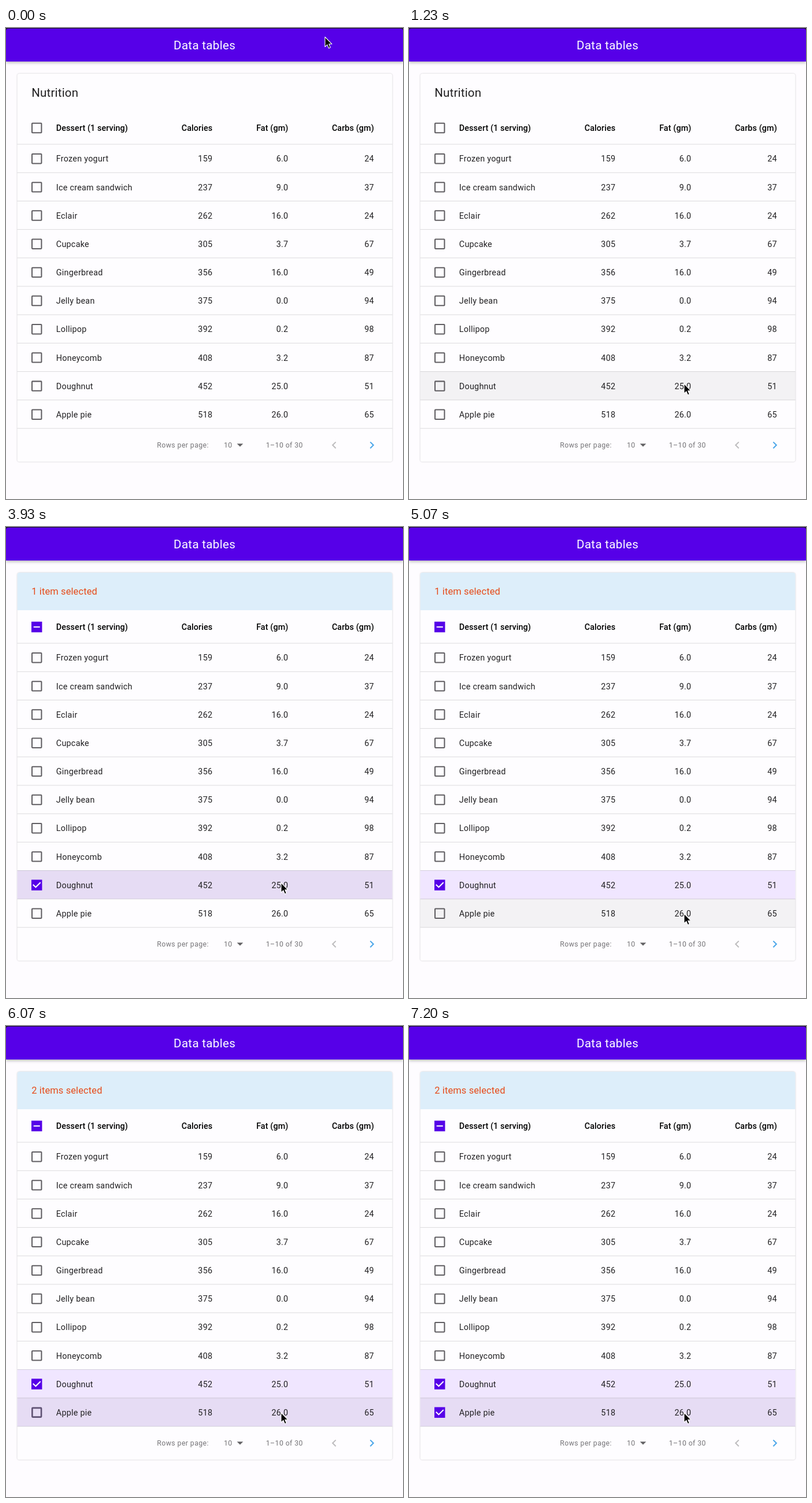
Recreate the animation shown at these times as an HTML page. Size 687 by 815 pixels, loop 7.26 s.

```html
<!DOCTYPE html>
<html lang="en">
<head>
<meta charset="utf-8">
<title>Data tables</title>
<style>
  html, body { margin: 0; width: 100%; height: 100%; overflow: hidden; background: #fefcff; }
  svg { display: block; }
  text { font: 14.35px Roboto, sans-serif; letter-spacing: .256px; fill: #212022; white-space: pre; }
  .title { font-size: 20.5px; letter-spacing: .33px; fill: #fff; }
  .heading { font-size: 20.5px; letter-spacing: .2px; }
  .selected { font-size: 16.4px; letter-spacing: .154px; fill: #e64a19; }
  .column { font-weight: 500; letter-spacing: .1px; fill: #000; }
  .footer { font-size: 12.3px; letter-spacing: .41px; fill: #757477; }
  .end { text-anchor: end; }
  .line { fill: rgba(0, 0, 0, .135); }
  .bar { filter: drop-shadow(0 2px 2.5px rgba(0, 0, 0, .28)); }
  .card { filter: drop-shadow(0 .8px 1px rgba(0, 0, 0, .22)); }
  .mark { fill: none; stroke: #fff; stroke-width: 2.05; }
</style>
</head>
<body>
<svg id="stage" width="687" height="815" viewBox="0 0 687 815"></svg>
<script>
const LOOP = 7260;
const LEFT = 19.5, WIDTH = 649, TOP = 201, STEP = 49.17;
const COLUMN_ENDS = [357.3, 488.4, 636.8];
const DESSERTS = [
  ['Frozen yogurt', '159', '6.0', '24'],
  ['Ice cream sandwich', '237', '9.0', '37'],
  ['Eclair', '262', '16.0', '24'],
  ['Cupcake', '305', '3.7', '67'],
  ['Gingerbread', '356', '16.0', '49'],
  ['Jelly bean', '375', '0.0', '94'],
  ['Lollipop', '392', '0.2', '98'],
  ['Honeycomb', '408', '3.2', '87'],
  ['Doughnut', '452', '25.0', '51'],
  ['Apple pie', '518', '26.0', '65']
];
// `shown` is when the row turns selected; `toggled` is where its checkbox motion begins.
const CLICKS = [
  { row: 8, shown: 2700, toggled: 2650, radius: 34, y: 617 },
  { row: 9, shown: 6070, toggled: 6045, radius: -8, y: 669 }
];
const MOVES = [
  { start: 830, end: 1230, from: [552, 15.5], to: [476, 615.5] },
  { start: 4630, end: 4930, from: [476, 615.5], to: [476, 669] }
];

const stage = document.getElementById('stage');
const clamp = x => Math.min(1, Math.max(0, x));
const mix = (a, b, k) => a + (b - a) * k;
const easeInOut = x => x * x * (3 - 2 * x);

function set(el, attrs) {
  for (const name in attrs) el.setAttribute(name, attrs[name]);
  return el;
}

function add(tag, attrs = {}, parent = stage) {
  const el = document.createElementNS('http://www.w3.org/2000/svg', tag);
  return parent.appendChild(set(el, attrs));
}

function label(x, y, string, style = '') {
  const el = add('text', { x, y, class: style });
  el.textContent = string;
  return el;
}

function addCheckbox(y, markPath) {
  const group = add('g', { transform: `translate(53.2 ${y})` });
  return {
    box: add('rect', { fill: 'none' }, group),
    mark: add('path', { d: markPath, class: 'mark', pathLength: 1 }, group)
  };
}

// The outline thickens inwards until the box is solid, then the mark is drawn.
function poseCheckbox({ box, mark }, time, toggled, centred) {
  const t = Math.pow(clamp((time - toggled) / 200), 1.7);
  const size = 18.45 - 2 * (1 - Math.abs(t - .5) * 2);
  const outer = t > 0 ? size : 18.45;
  const stroke = Math.min(outer / 2, 2.05 + outer * t);
  const side = outer - stroke;
  const tint = clamp(t * 4);
  const colour = [mix(96, 86, tint), mix(94, 0, tint), mix(98, 232, tint)].map(Math.round);
  set(box, {
    x: -side / 2, y: -side / 2, width: side, height: side, rx: stroke < 4 ? .8 : 0,
    'stroke-width': stroke, stroke: `rgb(${colour})`
  });
  const drawn = clamp(t * 2 - 1);
  set(mark, {
    visibility: drawn > 0 ? 'visible' : 'hidden',
    'stroke-dasharray': `${drawn} 2`,
    'stroke-dashoffset': centred ? -(1 - drawn) / 2 : 0
  });
}

const CHECK = 'M-6.5 -.9L-1.8 3.7L6.5 -4.6';
const DASH = 'M-5.5 0H5.5';

// Card, banner and heading
add('rect', { x: LEFT, y: 79, width: WIDTH, height: 671.5, rx: 4, fill: '#fefdff', class: 'card' });
const banner = add('path', {
  d: `M${LEFT} 144V83q0 -4 4 -4h${WIDTH - 8}q4 0 4 4v61z`, fill: '#ddeefa'
});
const heading = label(44.2, 119.3, 'Nutrition', 'heading');
const selection = label(44.2, 117.4, '', 'selected');

// Column names
const headBox = addCheckbox(173, DASH);
label(86.8, 178.3, 'Dessert (1 serving)', 'column');
['Calories', 'Fat (gm)', 'Carbs (gm)'].forEach((name, i) =>
  label(COLUMN_ENDS[i], 178.3, name, 'column end'));

// Rows
const rows = DESSERTS.map(([name, ...values], i) => {
  const y = TOP + i * STEP;
  const area = { x: LEFT, y, width: WIDTH, height: STEP };
  const fill = add('rect', { ...area, fill: '#f0e6ff' });
  const hover = add('rect', { ...area, fill: 'rgba(0,0,0,.043)' });
  const clip = add('svg', { ...area, overflow: 'hidden' });
  const ripple = add('circle', { cx: 476 - LEFT, fill: 'rgba(188,188,188,.38)', r: 0 }, clip);
  const checkbox = addCheckbox(226.2 + i * STEP, CHECK);
  const baseline = 231.4 + i * STEP;
  label(86.8, baseline, name);
  values.forEach((value, k) => label(COLUMN_ENDS[k], baseline, value, 'end'));
  return { y, fill, hover, ripple, checkbox, click: CLICKS.find(c => c.row === i) };
});
for (let i = 0; i <= rows.length; i++) {
  add('rect', { x: LEFT, y: TOP - .4 + i * STEP, width: WIDTH, height: 1.03, class: 'line' });
}

// Footer
label(261.3, 726, 'Rows per page:', 'footer');
label(377, 726, '10', 'footer');
add('path', { d: 'M399.7 719.3h10.6l-5.3 5.3z', fill: '#626164' });
label(449.8, 726, '1–10 of 30', 'footer');
const CHEVRON = 'M-2.4 -6.15L-3.8 -4.7L.9 0L-3.8 4.7L-2.4 6.15L3.8 0z';
add('path', { d: CHEVRON, transform: 'translate(567.6 721.8) scale(-1 1)', fill: '#bdbcbe' });
add('path', { d: CHEVRON, transform: 'translate(633.4 721.8)', fill: '#4ba6e9' });

// App bar
add('rect', { width: 687, height: 10, fill: '#1d1426' });
add('path', { d: 'M0 58V5q0 -4 4 -4h679q4 0 4 4v53z', fill: '#5600e8', class: 'bar' });
label(343.6, 37.4, 'Data tables', 'title').setAttribute('text-anchor', 'middle');

const cursor = add('path', {
  d: 'M0 0V17L3.9 13.4L6.5 19.5L9.3 18.3L6.8 12.3H12z',
  fill: '#000', stroke: '#fff', 'stroke-width': 1.1, 'stroke-linejoin': 'round'
});

function cursorAt(time) {
  const move = time < MOVES[1].start ? MOVES[0] : MOVES[1];
  const k = easeInOut(clamp((time - move.start) / (move.end - move.start)));
  return move.from.map((v, i) => mix(v, move.to[i], k));
}

const show = (el, visible) => el.setAttribute('visibility', visible ? 'visible' : 'hidden');

function draw(time) {
  const [x, y] = cursorAt(time);
  cursor.setAttribute('transform', `translate(${x} ${y})`);

  const count = CLICKS.filter(c => time >= c.shown).length;
  show(banner, count);
  show(selection, count);
  show(heading, !count);
  selection.textContent = count === 1 ? '1 item selected' : `${count} items selected`;
  poseCheckbox(headBox, count ? time : 0, CLICKS[0].toggled, true);

  for (const row of rows) {
    const { click } = row;
    const active = click && time >= click.shown;
    show(row.fill, active);
    show(row.hover, y >= row.y && y < row.y + STEP);
    poseCheckbox(row.checkbox, active ? time : 0, click ? click.toggled : LOOP, false);
    const radius = active ? Math.max(0, click.radius + time - click.shown) : 0;
    set(row.ripple, {
      r: radius,
      cy: click ? click.y - row.y : 0,
      opacity: 1 - clamp((radius - 34) / 200)
    });
  }
}

const start = performance.now();
function tick() {
  draw((performance.now() - start) % LOOP);
  requestAnimationFrame(tick);
}
tick();
</script>
</body>
</html>
```
